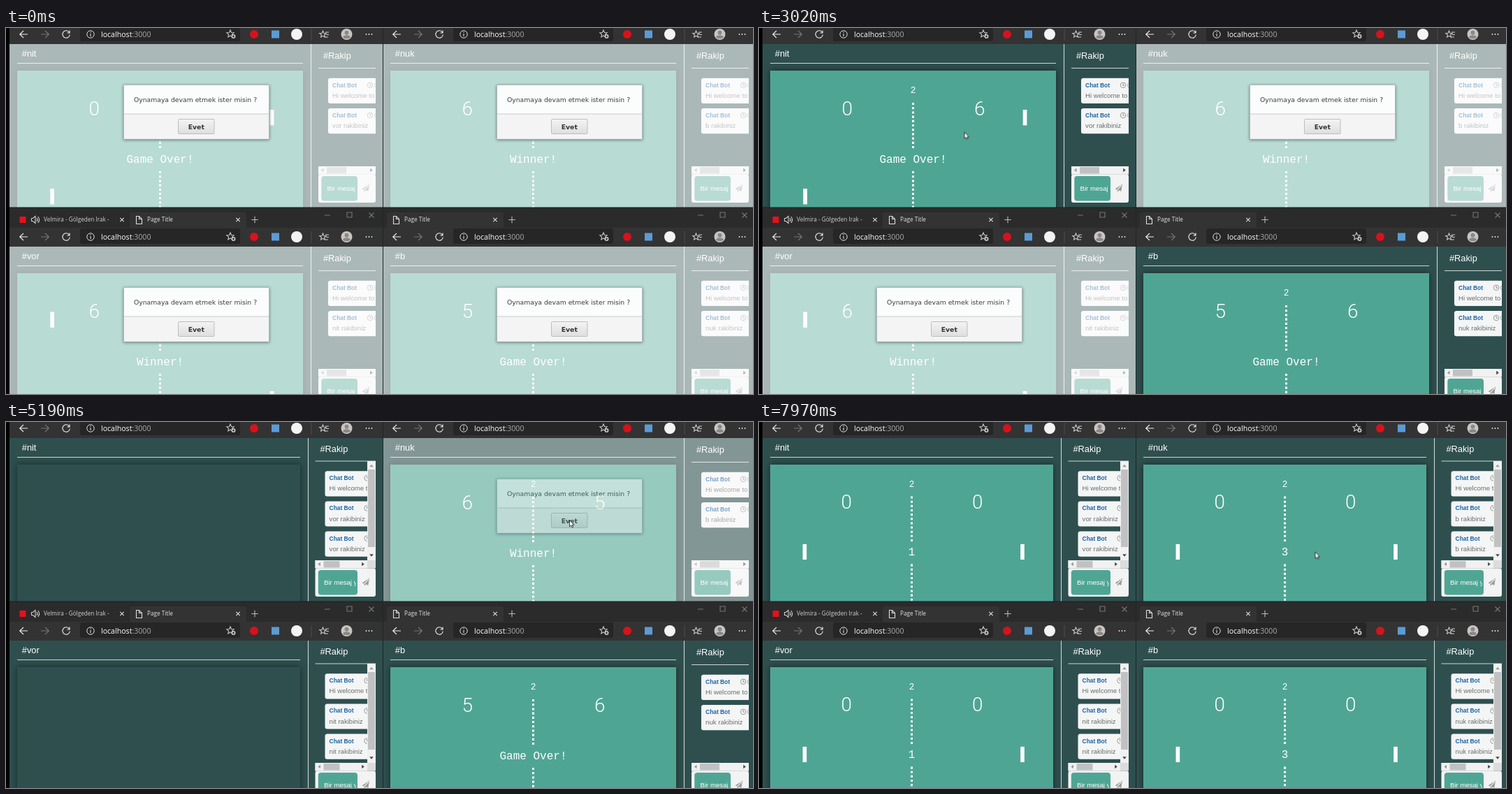
Recreate the animation shown at these times as an HTML page. Size 1069x524 px, loop 8000 ms.

```html
<!DOCTYPE html>
<html lang="tr">
<head>
<meta charset="utf-8">
<title>Pong</title>
<style>
html, body { margin: 0; width: 100%; height: 100%; overflow: hidden; background: #000; }
#stage { display: block; width: 1069px; height: 524px; font-family: "Liberation Sans", Arial, sans-serif; }
text { white-space: pre; }
.mono { font-family: "Liberation Mono", monospace; text-anchor: middle; }
.score { font-family: Roboto, sans-serif; font-weight: 300; text-anchor: middle; }
.ui { font-family: "Open Sans", sans-serif; }
.dialog { font-family: "DejaVu Sans", sans-serif; text-anchor: middle; }
.bold { font-weight: 700; }
.line { fill: none; stroke-width: 1.1; }
.shade { filter: drop-shadow(0 0 5px rgba(0, 0, 0, .5)); }
.lift { filter: drop-shadow(0 1px 2px rgba(0, 0, 0, .45)); }
</style>
</head>
<body>
<svg id="stage" viewBox="0 0 1069 524"></svg>
<script>
const LOOP = 8000, PAGE = '#2f4f4f', GREEN = '#4fa594', BAR = '#333333';
let css = '';

// Animation helpers: times are in ms of the loop.
function keyframes(name, points, easing) {
  css += `@keyframes ${name}{${points.map(([ms, rule]) => `${ms / LOOP * 100}%{${rule}}`).join('')}}`;
  return `style="animation:${name} ${LOOP}ms ${easing} infinite"`;
}
function show(from, to = LOOP) {
  const points = [[from, 'opacity:1'], [to, 'opacity:0']];
  if (from) points.unshift([0, 'opacity:0']);
  if (to < LOOP) points.push([LOOP, 'opacity:0']);
  return keyframes(`show${from}to${to}`, points, 'step-end');
}
const fadeOut = at => keyframes(`fade${at}`,
  [[0, 'opacity:1'], [at, 'opacity:1'], [at + 250, 'opacity:0'], [LOOP, 'opacity:0']], 'linear');

// Shape helpers.
const rect = (x, y, w, h, fill, more = '') =>
  `<rect x="${x}" y="${y}" width="${w}" height="${h}" fill="${fill}" ${more}/>`;
const circle = (x, y, r, fill, more = '') => `<circle cx="${x}" cy="${y}" r="${r}" fill="${fill}" ${more}/>`;
const text = (x, y, size, fill, s, cls = '') =>
  `<text x="${x}" y="${y}" font-size="${size}" fill="${fill}" class="${cls}">${s}</text>`;
const line = (d, stroke, more = '') => `<path class="line" d="${d}" stroke="${stroke}" ${more}/>`;
const group = (attrs, s) => `<g ${attrs}>${s}</g>`;
const clip = (x, y, w, h, s) =>
  `<svg x="${x}" y="${y}" width="${w}" height="${h}" viewBox="${x} ${y} ${w} ${h}">${s}</svg>`;
const arrow = (x, y, turn, fill) =>
  `<path d="M-1.8-2.8L1.8 0L-1.8 2.8z" fill="${fill}" transform="translate(${x} ${y}) rotate(${turn})"/>`;
const cross = (x, y, r, stroke) =>
  line(`M${x - r} ${y - r}l${2 * r} ${2 * r}M${x + r} ${y - r}l${-2 * r} ${2 * r}`, stroke);
const plus = (x, y, r, stroke) => line(`M${x - r} ${y}h${2 * r}M${x} ${y - r}v${2 * r}`, stroke);

function star(x, y, r) {
  const pts = Array.from({ length: 10 }, (_, i) => {
    const a = i * Math.PI / 5 - Math.PI / 2, q = i % 2 ? r * .45 : r;
    return `${(x + q * Math.cos(a)).toFixed(1)},${(y + q * Math.sin(a)).toFixed(1)}`;
  });
  return `<polygon points="${pts.join(' ')}" class="line" stroke="#c8c8c8" stroke-width="1"/>`;
}

function toolbar() {
  return rect(0, -4, 540, 27, BAR) +
    line('M31 9H20M25 4l-5.3 5l5.3 5', '#eee') +
    line('M50 9h11M56 4l5.3 5l-5.3 5', '#777') +
    line('M90.5 6.2A5.2 5.2 0 1 0 91.3 9.5M91 3.5v3.5h-3.5', '#eee') +
    rect(106, -3, 229, 22, '#262626', 'rx="3"') +
    circle(121, 9, 5.2, 'none', 'stroke="#ddd"') + line('M121 8v4M121 5.5v1.2', '#ddd') +
    text(136, 13, 10.6, '#fff', 'localhost<tspan fill="#aaa">:3000</tspan>', 'ui') +
    star(321, 8.5, 5.5) + circle(325.5, 12, 3, '#c8c8c8') + plus(325.5, 12, 1.6, '#262626') +
    circle(355, 9, 6, '#d8121c') + rect(380, 3.5, 11, 11, '#5b9bd5') + circle(416, 9, 8, '#f4f4f4') +
    line('M437 1v17', '#4c4c4c') +
    star(453.5, 9, 5) + line('M457 6h5M458 9.5h4M456 13h5', '#ccc') +
    circle(487.5, 9, 8, '#c9c5c3') + circle(487.5, 6.7, 2.9, '#8b8785') +
    '<path d="M482.2 13.8q0-3.6 5.3-3.6t5.3 3.6q-5.3 3-10.6 0z" fill="#8b8785"/>' +
    [515.5, 519.5, 523.5].map(x => circle(x, 9, .9, '#eee')).join('');
}

function tab(x) {
  return `<path d="M${x}-4v-19q0-3 3-3h161q3 0 3 3v19z" fill="${BAR}"/>` +
    line(`M${x + 9.5}-20.5h4l4 4v7h-8zM${x + 13.5}-20.5v4h4`, '#ddd') +
    text(x + 25, -13, 8.2, '#e2e2e2', 'Page Title', 'ui') +
    cross(x + 155, -15.5, 2.7, '#ddd') + plus(x + 179, -15.5, 4.8, '#bbb');
}

function strip(w) {
  const controls = c => line('M456-22h8M488-26h7v7h-7z', c) + cross(523, -22, 3.5, c);
  const music = rect(19.5, -20, 9, 9, '#e8101c') +
    line('M36.5-17.5h2l3.5-3v10l-3.5-3h-2zM44-18q2 2.500 0 5M45.800-20q3.600 4.500 0 9', '#ccc') +
    clip(54, -28, 98, 20, text(54, -13, 8.2, '#d0d0d0', 'Velmira - Gölgeden Irak -', 'ui')) +
    cross(166, -15.5, 2.7, '#ddd');
  return rect(0, -33, 540, 29, '#2b2b2b') + controls('#777') +
    group(show(...w.active), rect(0, -33, 540, 29, '#181818') + controls('#fff')) +
    (w.music ? music : '') + tab(w.tab);
}

function chat(w, narrow) {
  const x = narrow ? 456.3 : 460.8, y = narrow ? 70.2 : 71.8, right = narrow ? 517 : 529;
  const lines = ['Hi welcome to', ...Array(narrow ? 2 : 1).fill(w.rival + ' rakibiniz')];
  const bubble = (s, i) => group(`transform="translate(${x} ${y + 43.2 * i})"`,
    rect(0, 0, 90, 36.2, '#f4f5f5', 'rx="3.500"') +
    text(6.3, 13, 8.4, '#1d64a4', 'Chat Bot', 'bold') +
    text(6.3, 28.3, 9.6, '#6c6c6c', s) +
    circle(60.3, 10, 3.8, 'none', 'stroke="#999"') + line('M60.300 7.500v2.800h2', '#999') +
    text(66, 13, 8.4, '#999', '04:12'));
  return clip(x, 58, right - x, 139, lines.map(bubble).join(''));
}

function sidebar(w, narrow) {
  const x = narrow ? 442.5 : 447, right = narrow ? 517 : 529, field = x + 4.3;
  return line(`M${narrow ? 432.5 : 436.5} 23V260`, '#cdd5d5') +
    text(x + 7, narrow ? 43 : 44, 12.8, '#fff', '#Rakip') +
    line(`M${x} ${narrow ? 56 : 57.5}H529`, '#cdd5d5') + chat(w, narrow) +
    rect(x, 198, 529 - x, 11.5, narrow ? '#dcdcdc' : '#f1f1f1') + rect(x, 198, right - x, 11.5, '#f1f1f1') +
    rect(x + 12, 199, narrow ? 23 : 28, 9.5, '#c1c1c1') +
    arrow(x + 5.7, 203.5, 180, '#999') + arrow(right - 6, 203.5, 0, '#444') +
    (narrow ? rect(517, 56, 12, 142, '#f1f1f1') + rect(518, 68, 10, 111, '#c1c1c1') +
      arrow(523, 62.5, -90, '#999') + arrow(523, 191, 90, '#444') : '') +
    rect(x, 209.5, 529 - x, 40.5, '#f2f3f3', 'rx="3"') +
    rect(field, 212, 503 - field, 35.5, GREEN, 'rx="4"') +
    clip(field, 212, 500.5 - field, 35, text(field + 8.2, 233, 9.6, '#fff', 'Bir mesaj yaz')) +
    '<path d="M509.500 230.500L520 223.500L518.300 233.800L514.800 232.300L513 235L512.500 231.600z" fill="#9b9b9b"/>' +
    line('M512.500 231.800L519 225', '#f2f3f3', 'stroke-width=".7"');
}

function court(scores, paddles, label) {
  return rect(16, 61, 409, 260, GREEN) +
    text(220.5, 93, 12.8, '#fff', '2', 'mono') +
    text(126.3, 125, 28, '#fff', scores[0], 'score') + text(315.7, 125, 28, '#fff', scores[1], 'score') +
    line('M220.500 107V172.500M220.500 205V300', '#fff', 'style="stroke-width:3;stroke-dasharray:3.1"') +
    paddles.map(([x, y]) => rect(x, y, 5.7, 22.4, '#fff')).join('') + label;
}

const label = s => text(220.5, 192.5, 16, '#fff', s, 'mono');

function layout(w, narrow) {
  const edge = narrow ? 421 : 425;
  const counts = w.counts.map((from, i) => group(show(from, w.counts[i + 1]), label(3 - i))).join('');
  const board = narrow
    ? group(show(w.counts[0]), group('transform="translate(16 61) scale(.9902) translate(-16 -61)"',
        court([0, 0], [[63, 176], [377.7, 176]], counts)))
    : court(w.scores, w.paddles, label(w.result));
  return rect(0, 23, 540, 240, PAGE) + text(22.8, 40.6, 12.8, '#fff', '#' + w.name) +
    line(`M16 50.500H${edge}`, '#cdd5d5') +
    rect(16, 61, edge - 16, 260, PAGE, 'class="shade"') + board + sidebar(w, narrow);
}

function dialog() {
  return rect(0, 23, 540, 240, 'rgba(255,255,255,.6)') +
    group('class="lift"', rect(168.5, 81.5, 208, 77.5, '#fbfdfc', 'stroke="#aab5b3" stroke-width=".8"')) +
    rect(169, 123, 207, 35.6, '#f4f4f4') + line('M169 123H376', '#ccc') +
    text(271, 106, 9.25, '#3a3a3a', 'Oynamaya devam etmek ister misin ?', 'dialog') +
    rect(246.5, 130.5, 51.5, 21, 'url(#button)', 'rx="1" stroke="#bdbdbd"') +
    text(272.3, 144.8, 9.3, '#333', 'Evet', 'dialog bold');
}

function browser(w) {
  const { x, y, width, height, dx, top } = w;
  return `<svg x="${x}" y="${y}" width="${width}" height="${height}" viewBox="${dx} ${top} ${width} ${height}">` +
    group(show(0, w.restart), layout(w, false)) + group(show(w.restart), layout(w, true)) +
    group(fadeOut(w.click), dialog()) + (w.active ? strip(w) : '') + toolbar() + '</svg>';
}

const left = { x: 5, width: 534, dx: 5, restart: 4930, counts: [5930, 6950, 7970] };
const right = { x: 540, width: 529, dx: 6, restart: 6950, counts: [7970], paddles: [] };
const upper = { y: 0, height: 257, top: 0 };
const lower = { y: 257, height: 267, top: -33 };
const windows = [
  { ...left, ...upper, name: 'nit', rival: 'vor', scores: [0, 6], result: 'Game Over!', click: 2640,
    paddles: [[63.3, 230], [377.7, 117]] },
  { ...right, ...upper, name: 'nuk', rival: 'b', scores: [6, 5], result: 'Winner!', click: 5110 },
  { ...left, ...lower, name: 'vor', rival: 'nit', scores: [6, 0], result: 'Winner!', click: 3860,
    paddles: [[63.3, 116.5], [377.7, 230]], active: [3860, 5110], tab: 177, music: true },
  { ...right, ...lower, name: 'b', rival: 'nuk', scores: [5, 6], result: 'Game Over!', click: 980,
    active: [980, 1770], tab: 11 }
];

// Pointer path: time, x, y.
const path = [
  [0, 969, 510], [30, 969, 510], [250, 850, 455], [520, 796, 428], [1200, 796, 428], [1450, 801, 270],
  [1720, 797, 128], [1770, 797, 126], [1850, 788, 120], [2000, 792, 122], [2080, 811, 135],
  [2300, 560, 150], [2560, 282, 140], [2840, 282, 141], [3020, 293.5, 148], [3300, 288, 290],
  [3630, 281, 427], [3680, 278, 424], [4120, 278, 424], [4350, 560, 300], [4620, 846, 162],
  [4770, 849, 153], [5010, 806, 140], [5350, 806, 140], [5520, 810, 150], [5880, 806.5, 166.5],
  [6310, 805, 177], [6620, 798, 190], [7330, 798, 190], [7370, 797, 188], [7510, 797, 188],
  [7740, 795.5, 185.5], [LOOP, 795.5, 185.5]
];
const moves = keyframes('pointer', path.map(([t, x, y]) => [t, `transform:translate(${x}px,${y}px)`]), 'linear');
const pointer = '<path d="M.5.500V9.800L2.700 7.900L4.100 11L5.600 10.300L4.200 7.400H6.900z" fill="#fff" stroke="#111" stroke-width=".8"/>';

const art = '<defs><linearGradient id="button" x2="0" y2="1"><stop stop-color="#f3f3f3"/>' +
  '<stop offset="1" stop-color="#dedede"/></linearGradient></defs>' +
  rect(0, 0, 1069, 524, '#000') + rect(539, 0, 1, 524, '#1d2626') +
  windows.map(browser).join('') + rect(5, 256.5, 1064, 1, '#1c2020') +
  group(show(30), group(moves, pointer));

document.head.appendChild(document.createElement('style')).textContent = css;
document.getElementById('stage').innerHTML = art;
</script>
</body>
</html>
```
